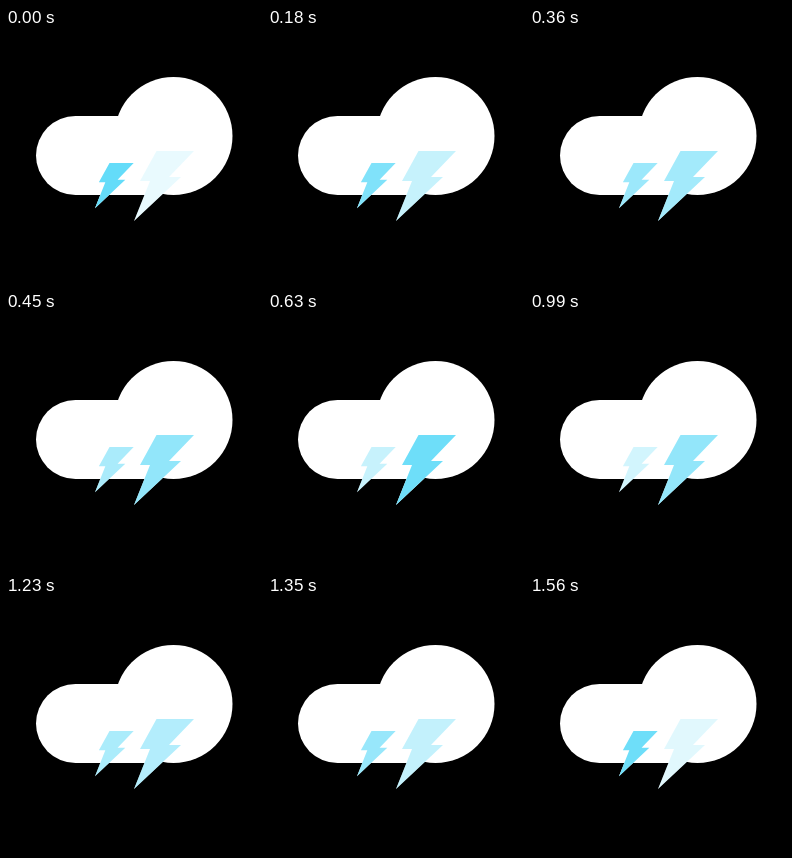
Recreate the animation shown at these times as an HTML page. Size 256x256 px, loop 1.62 s.

```html
<!DOCTYPE html>
<html lang="en">
<head>
<meta charset="utf-8">
<title>Thunder cloud</title>
<style>
  html, body { margin: 0; width: 100%; height: 100%; overflow: hidden; background: #000; }
  svg { display: block; width: 100vw; height: 100vh; }
  .cloud, .base { fill: #fff; }
  .glow { fill: #64dcf9; animation: 1620ms -1ms infinite; }
  .large .glow { animation-name: large; }
  .small .glow { animation-name: small; }

  /* Hard steps: 90 ms apart while charging, 120 ms while fading */
  @keyframes large {
    0%       { opacity: .14; animation-timing-function: steps(7); }
    38.8889% { opacity: .93; animation-timing-function: steps(1); }
    46.2963% { opacity: .9;  animation-timing-function: steps(6); }
    90.7407% { opacity: .28; animation-timing-function: steps(1); }
    96.2963%, 100% { opacity: .19; animation-timing-function: steps(1); }
  }
  @keyframes small {
    0%       { opacity: 1;   animation-timing-function: steps(7); }
    38.8889% { opacity: .36; animation-timing-function: steps(2); }
    53.7037% { opacity: .16; animation-timing-function: steps(5); }
    90.7407% { opacity: .79; animation-timing-function: steps(1); }
    96.2963%, 100% { opacity: .93; animation-timing-function: steps(1); }
  }
</style>
</head>
<body>
<svg viewBox="0 0 256 256">
  <defs>
    <path id="bolt" d="M22.5 0H60L35 26H47L0 70L16 30H6Z"/>
  </defs>
  <g class="cloud">
    <rect x="30" y="88" width="150" height="79" rx="39.5"/>
    <circle cx="167.5" cy="108" r="59"/>
  </g>
  <g class="large" transform="translate(128 123)">
    <use class="base" href="#bolt"/>
    <use class="glow" href="#bolt"/>
  </g>
  <g class="small" transform="translate(89 135) scale(.645)">
    <use class="base" href="#bolt"/>
    <use class="glow" href="#bolt"/>
  </g>
</svg>
</body>
</html>
```
